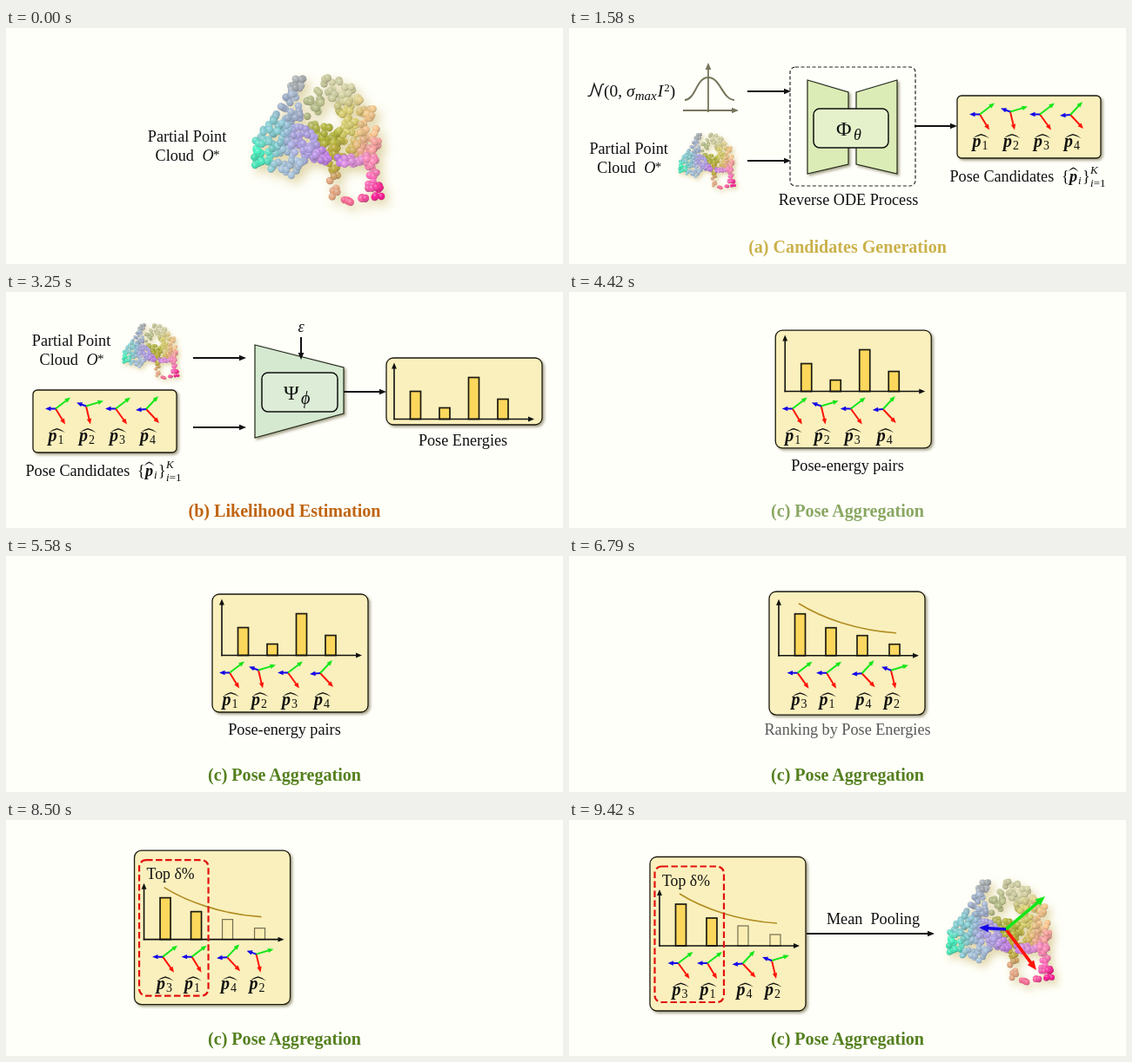
An HTML page for the animation above (9460 ms loop, 640 by 272 pixels).

```html
<!DOCTYPE html>
<html lang="en">
<head>
<meta charset="utf-8">
<title>Pose estimation pipeline</title>
<style>
html, body { margin: 0; width: 100%; height: 100%; overflow: hidden; background: #fffffa; }
svg { display: block; width: 640px; height: 272px; }
text { font: 18.2px "Liberation Serif", "Times New Roman", serif; fill: #111; white-space: pre; }
.mid { text-anchor: middle; }
.it { font-style: italic; }
.bi { font-style: italic; font-weight: bold; }
.cap { font-size: 20.1px; font-weight: bold; text-anchor: middle; }
.panel { fill: #faf0bd; stroke: #1c1a10; stroke-width: 1.3; filter: url(#drop); }
.net { stroke: #20281a; stroke-width: 1.2; filter: url(#drop); }
.core { stroke: #111; stroke-width: 1.5; }
</style>
</head>
<body>
<svg id="stage" viewBox="0 0 640 272" xmlns="http://www.w3.org/2000/svg"></svg>
<script>
const LOOP = 9460;
const A = [710, 1620], B = [1950, 2750], C = [3600, 4440],
      R = [5600, 6400], D = [6700, 7300], E = [7540, 9240];

const ramp = (t, a, b) => Math.min(1, Math.max(0, (t - a) / (b - a)));
const ease = u => 0.5 - 0.5 * Math.cos(Math.PI * u);

// Start value, then [move, value] pairs in order of time.
function track(t, start, ...stages) {
  return stages.reduce((v, [m, to]) => {
    const p = ease(ramp(t, ...m));
    return v.map((a, i) => a + (to[i] - a) * p);
  }, start);
}

// Filled arrow outline.
function arrow(x1, y1, x2, y2, w = 2, h = 8) {
  const len = Math.hypot(x2 - x1, y2 - y1), ux = (x2 - x1) / len, uy = (y2 - y1) / len;
  const pt = (s, n) => (x1 + ux * s - uy * n).toFixed(2) + ' ' + (y1 + uy * s + ux * n).toFixed(2);
  const k = w / 2, b = len - h, q = h * 0.42;
  return 'M' + [pt(0, k), pt(b, k), pt(b, q), pt(len, 0), pt(b, -q), pt(b, -k), pt(0, -k)].join('L') + 'Z';
}
const arrowTag = (color, ...a) => `<path fill="${color}" d="${arrow(...a)}"/>`;

function triad([b, g, r], w, h) {
  return arrowTag('#ff1408', 0, 0, ...r, w, h) + arrowTag('#14e619', 0, 0, ...g, w, h) +
         arrowTag('#1408e8', 0, 0, ...b, w, h);
}

const hat = (x, y, w) =>
  `<path d="M${x - w} ${y + 1.5}Q${x - w / 2} ${y - 2.5} ${x} ${y - 3.5}Q${x + w / 2} ${y - 2.5} ${x + w} ${y + 1.5}` +
  `Q${x + w / 2} ${y - 1} ${x} ${y - 2}Q${x - w / 2} ${y - 1} ${x - w} ${y + 1.5}Z" fill="#111"/>`;

// Point cloud ------------------------------------------------------------
let seed = 7;
const rnd = () => (seed = (seed * 16807) % 2147483647) / 2147483647;

const backHues = [
  [350, 90, '#b3bb84'], [380, 68, '#cfcfa0'], [372, 120, '#a9ad2e'], [395, 112, '#dacf68'],
  [416, 115, '#f0bd85'], [425, 140, '#f59a9a'], [380, 148, '#b8a830'], [375, 190, '#dfa07a']
];
const frontHues = [
  [285, 145, '#3ce6b4'], [300, 120, '#7cc7cc'], [325, 85, '#9fb1cc'], [335, 60, '#a3a9ad'],
  [325, 160, '#a3bfd8'], [345, 130, '#a99be0'], [375, 148, '#c07ae6'], [400, 152, '#dc8ad8'],
  [422, 155, '#ff86b4'], [420, 178, '#fa5fb0'], [430, 188, '#ee1087'], [392, 200, '#f2628c']
];
const patches = [
  [backHues, 18, '345,80 358,70 364,78 360,100 342,105'],
  [backHues, 32, '365,58 385,54 398,68 408,82 395,95 380,85 366,78'],
  [backHues, 100, '380,90 408,82 422,92 430,130 426,150 405,150 385,135 368,118'],
  [backHues, 45, '345,108 372,115 392,138 388,152 372,148 352,128'],
  [backHues, 14, '370,155 384,160 380,194 372,196'],
  [frontHues, 175, '325,72 334,80 340,105 365,138 372,150 340,155 335,172 312,168 300,160 284,158 284,135 295,112 312,98'],
  [frontHues, 16, '326,66 334,55 343,58 338,70 328,80'],
  [frontHues, 35, '345,135 375,148 420,146 428,152 400,158 370,156 345,148'],
  [frontHues, 20, '412,150 428,150 424,184 416,180'],
  [frontHues, 14, '414,182 430,180 432,194 422,196'],
  [frontHues, 5, '388,198 397,198 397,201 388,201'],
  [frontHues, 5, '408,194 416,194 416,197 408,197']
];

function hueAt(hues, x, y) {
  const sum = [0, 0, 0];
  let total = 0;
  for (const [hx, hy, hex] of hues) {
    const w = 1 / ((x - hx) ** 2 + (y - hy) ** 2 + 20) ** 2;
    total += w;
    for (let i = 0; i < 3; i++) sum[i] += w * parseInt(hex.substr(1 + 2 * i, 2), 16);
  }
  const light = 0.93 + 0.12 * rnd();
  return `rgb(${sum.map(s => Math.min(255, Math.round(s / total * light)))})`;
}

function inside(poly, x, y) {
  let hit = false;
  poly.forEach(([ax, ay], i) => {
    const [bx, by] = poly[(i + 1) % poly.length];
    if (ay > y !== by > y && x < ax + (bx - ax) * (y - ay) / (by - ay)) hit = !hit;
  });
  return hit;
}

function cloudBalls() {
  let out = '';
  for (const [hues, count, pts] of patches) {
    const poly = pts.split(' ').map(p => p.split(',').map(Number));
    const xs = poly.map(p => p[0]), ys = poly.map(p => p[1]);
    const x0 = Math.min(...xs), y0 = Math.min(...ys);
    const w = Math.max(...xs) - x0, h = Math.max(...ys) - y0;
    for (let n = 0; n < count;) {
      const x = x0 + rnd() * w, y = y0 + rnd() * h;
      if (!inside(poly, x, y)) continue;
      const at = `cx="${(x - 360).toFixed(1)}" cy="${(y - 128).toFixed(1)}" r="4.2"`;
      out += `<circle ${at} fill="${hueAt(hues, x, y)}"/><circle ${at} fill="url(#ball)"/>`;
      n++;
    }
  }
  return out;
}

// Diagram parts ----------------------------------------------------------
const heights = [32, 13, 48, 23];
const barStart = [18.5, 52, 85.5, 119], barRanked = [54, 127, 18.5, 90];
const rowStart = [26, 61, 95, 130], rowPaired = [9, 42, 76, 113], rowRanked = [55, 129, 21.5, 95.5];
const poses = [
  [[-12, 0], [17, -13], [11, 18]],
  [[-11, -4], [20, -6], [5, 21]],
  [[-12, 0], [17, -13], [13, 18]],
  [[-12, 1], [14, -15], [15, 16]]
];
const lift = [0, -3, 0, 0.5], nudge = [1.5, 2, 3, 3];

const poseTags = poses.map((v, i) => `<g id="pose${i}">
  <g transform="translate(0 ${lift[i]})">${triad(v, 2, 6.5)}</g>
  <g transform="translate(${nudge[i]} 0)">
    <text class="bi" x="-10" y="37" style="font-size:20px">p</text>
    <text x="1" y="40" style="font-size:14px">${i + 1}</text>${hat(0, 26, 9.5)}
  </g></g>`).join('');

const barTags = heights.map((h, i) =>
  `<rect id="bar${i}" y="${-h}" width="12" height="${h}" fill="#fbd75c" stroke="#1c1a10" stroke-width="1.7"/>`).join('');

const caption = (id, color, s) => `<text id="${id}" class="cap" x="320" y="259" style="fill:${color}">${s}</text>`;

const stage = document.getElementById('stage');
stage.innerHTML = `
<defs>
  <radialGradient id="ball" cx=".38" cy=".34" r=".68">
    <stop offset="0" stop-color="#fff" stop-opacity=".42"/>
    <stop offset=".55" stop-color="#fff" stop-opacity="0"/>
    <stop offset="1" stop-color="#302820" stop-opacity=".34"/>
  </radialGradient>
  <filter id="drop" x="-10%" y="-10%" width="125%" height="130%">
    <feDropShadow dx="2" dy="2" stdDeviation="1.5" flood-color="#3a3410" flood-opacity=".45"/>
  </filter>
  <filter id="glow" x="-20%" y="-20%" width="145%" height="145%">
    <feDropShadow dx="5" dy="6" stdDeviation="6" flood-color="#b8a040" flood-opacity=".45"/>
  </filter>
  <g id="balls" filter="url(#glow)">${cloudBalls()}</g>
</defs>
<rect width="640" height="272" fill="#fffffa"/>

<g id="gen">
  <path d="M22.500 78q3 2 4.500-3l3-10.500 5 13.500 3-11q.8-3 3.200-2" fill="none" stroke="#111" stroke-width="1.4" transform="translate(-1 0)"/>
  <text x="40" y="79" style="font-size:19.500px">(0, <tspan class="it">σ</tspan><tspan class="it" style="font-size:15px" dy="4">max</tspan><tspan class="it" dy="-4" dx="1">I</tspan><tspan style="font-size:13px" dy="-6" dx="1">2</tspan><tspan dy="6">)</tspan></text>
  ${arrowTag('#77755a', 160, 97, 160, 40, 1.8, 8)}${arrowTag('#77755a', 131, 95, 195, 95, 1.8, 8)}
  <path d="M133 83C146 82 146 57 160 57S176 82 190 83" fill="none" stroke="#77755a" stroke-width="2"/>
  <rect x="254" y="45" width="144" height="137" rx="6" fill="none" stroke="#222" stroke-width="1.2" stroke-dasharray="4 2.500"/>
  <path class="net" fill="#dcecb6" d="M274 60L321 74V157L274 168ZM330 74L377 60V168L330 157Z"/>
  <rect class="core" fill="#e5f1cb" x="281" y="93" width="86" height="45" rx="7"/>
  <text x="307" y="124" style="font-size:24px">Φ</text><text class="it" x="327" y="129" style="font-size:18px">θ</text>
  <text class="mid" x="321" y="204">Reverse ODE Process</text>
</g>

<g id="est">
  <text class="it mid" x="339" y="46">ε</text>
  <path class="net" fill="#d5e8d0" d="M286 61L388 87V140L286 168Z"/>
  ${arrowTag('#111', 339, 52, 339, 78)}
  <rect class="core" fill="#dcecd6" x="294" y="93" width="87" height="45" rx="7"/>
  <text x="319" y="124" style="font-size:24px">Ψ</text><text class="it" x="339" y="129" style="font-size:20px">ϕ</text>
  <text class="mid" x="525" y="177">Pose Energies</text>
</g>

<g id="flow"><path id="flow0" fill="#111"/><path id="flow1" fill="#111"/><path id="flow2" fill="#111"/></g>

<g id="input">
  <g id="title">
    <text class="mid">Partial Point</text>
    <text x="-36.500" y="22">Cloud</text>
    <text class="it" x="17.500" y="22">O</text><text x="30" y="20" style="font-size:15px">*</text>
  </g>
  <use id="cloud" href="#balls"/>
</g>

<g id="cand">
  <rect class="panel" width="165" height="72" rx="5"/>
  <text x="-8.500" y="98.500">Pose Candidates</text>
  <text x="120" y="98.500">{</text>
  <text class="bi" x="129" y="98.500">p</text>${hat(133.500, 86, 6)}
  <text class="it" x="139" y="102" style="font-size:13px">i</text>
  <text x="144" y="98.500">}</text>
  <text class="it" x="153" y="90" style="font-size:13px">K</text>
  <text x="153" y="105" style="font-size:13px"><tspan class="it">i</tspan>=1</text>
</g>

<g id="chart">
  <rect id="frame" class="panel" width="179" rx="8"/>
  <g id="plot">
    ${barTags}
    ${arrowTag('#111', 0, 0.8, 0, -65, 1.6, 7)}${arrowTag('#111', -0.8, 0, 161, 0, 1.6, 7)}
    <path id="trend" d="M23 -60C50 -43 90 -29 135 -26" fill="none" stroke="#b18d22" stroke-width="1.6"/>
  </g>
  <g id="top">
    <rect x="5.500" y="11" width="79.500" height="156.500" rx="8" fill="none" stroke="#e3120e" stroke-width="2.200" stroke-dasharray="7.500 3.500"/>
    <text x="14" y="33" style="font-size:17.800px">Top δ%</text>
  </g>
</g>
<g id="poses">${poseTags}</g>

<text id="pairs" class="mid" x="320" y="206">Pose-energy pairs</text>
<text id="rank" class="mid" x="320" y="206">Ranking by Pose Energies</text>
<g id="result">
  <path fill="#111" d="${arrow(273, 131, 420, 131)}"/>
  <text class="mid" x="349.500" y="120">Mean  Pooling</text>
  <use href="#balls" transform="translate(497 128) scale(.81)"/>
  <g transform="translate(502 126)">${triad([[-31, -2], [45, -38], [35, 47]], 3.6, 11)}</g>
</g>
${caption('capA', '#b8960c', '(a) Candidates Generation')}
${caption('capB', '#c0640f', '(b) Likelihood Estimation')}
${caption('capC', '#55801f', '(c) Pose Aggregation')}`;

const el = {};
stage.querySelectorAll('[id]').forEach(e => el[e.id] = e);

function fade(id, o) {
  el[id].setAttribute('opacity', o.toFixed(3));
  el[id].style.display = o > 0 ? '' : 'none';
}
const part = (m, u) => m[0] + (m[1] - m[0]) * u;
const appear = (t, m) => m ? ramp(t, part(m, 0.6), part(m, 0.95)) : 1;
const vanish = (t, m) => m ? 1 - ramp(t, m[0], part(m, 0.5)) : 1;
const show = (t, id, from, to) => fade(id, appear(t, from) * vanish(t, to));
const place = (id, x, y, s = 1) =>
  el[id].setAttribute('transform', `translate(${x.toFixed(2)} ${y.toFixed(2)}) scale(${s.toFixed(4)})`);

function draw(t) {
  show(t, 'gen', A, B);
  show(t, 'est', B, C);
  show(t, 'flow', A, C);
  show(t, 'input', null, C);
  show(t, 'cand', A, C);
  show(t, 'chart', B);
  show(t, 'poses', A);
  show(t, 'pairs', C, R);
  show(t, 'trend', R);
  show(t, 'rank', R, D);
  show(t, 'top', D);
  show(t, 'result', E);
  fade('capA', ramp(t, 1300, 1680) * (1 - ramp(t, 2050, 2500)));
  fade('capB', ramp(t, 2350, 2800) * (1 - ramp(t, 3750, 4200)));
  fade('capC', ramp(t, 4200, 4520));

  place('title', ...track(t, [208, 131], [A, [68, 145]], [B, [75, 62]]));
  place('cloud', ...track(t, [360, 128, 1], [A, [158.5, 153, 0.43]], [B, [167, 68, 0.43]]));

  [[[205, 73, 255, 73], [215, 76, 276, 76]],
   [[205, 153, 255, 153], [215, 156, 276, 156]],
   [[397, 113, 446, 113], [388, 115, 437, 115]]]
    .forEach(([a, b], i) => el['flow' + i].setAttribute('d', arrow(...track(t, a, [B, b]))));

  place('cand', ...track(t, [446, 78], [B, [31, 113]]));

  const [fx, fy, fh] = track(t, [437, 76, 77], [C, [237, 44, 136]], [R, [230, 42, 140]],
                             [D, [230, 24, 177.5]], [E, [93, 42.5, 177.5]]);
  place('frame', fx, fy);
  el.frame.setAttribute('height', fh);
  place('top', fx, fy);

  const origin = [[C, [248, 114.5]], [R, [241, 114]], [D, [241, 126.5]], [E, [104, 145]]];
  place('plot', ...track(t, [446, 146.5], ...origin));

  const dim = ease(ramp(t, ...D));
  heights.forEach((h, i) => {
    const bar = el['bar' + i];
    bar.setAttribute('x', track(t, [barStart[i]], [R, [barRanked[i]]])[0]);
    if (i % 2) {
      bar.setAttribute('fill-opacity', 1 - 0.9 * dim);
      bar.setAttribute('stroke-opacity', 1 - 0.4 * dim);
      bar.setAttribute('stroke-width', 1.7 - 0.5 * dim);
    }
    const row = origin.map(([m, [x, y]]) => [m, [x + (m === C ? rowPaired : rowRanked)[i], y + 20]]);
    place('pose' + i, ...track(t, [446 + rowStart[i], 99.5], [B, [31 + rowStart[i], 134.5]], ...row));
  });
}

function tick() {
  draw(performance.now() % LOOP);
  requestAnimationFrame(tick);
}
tick();
</script>
</body>
</html>
```
